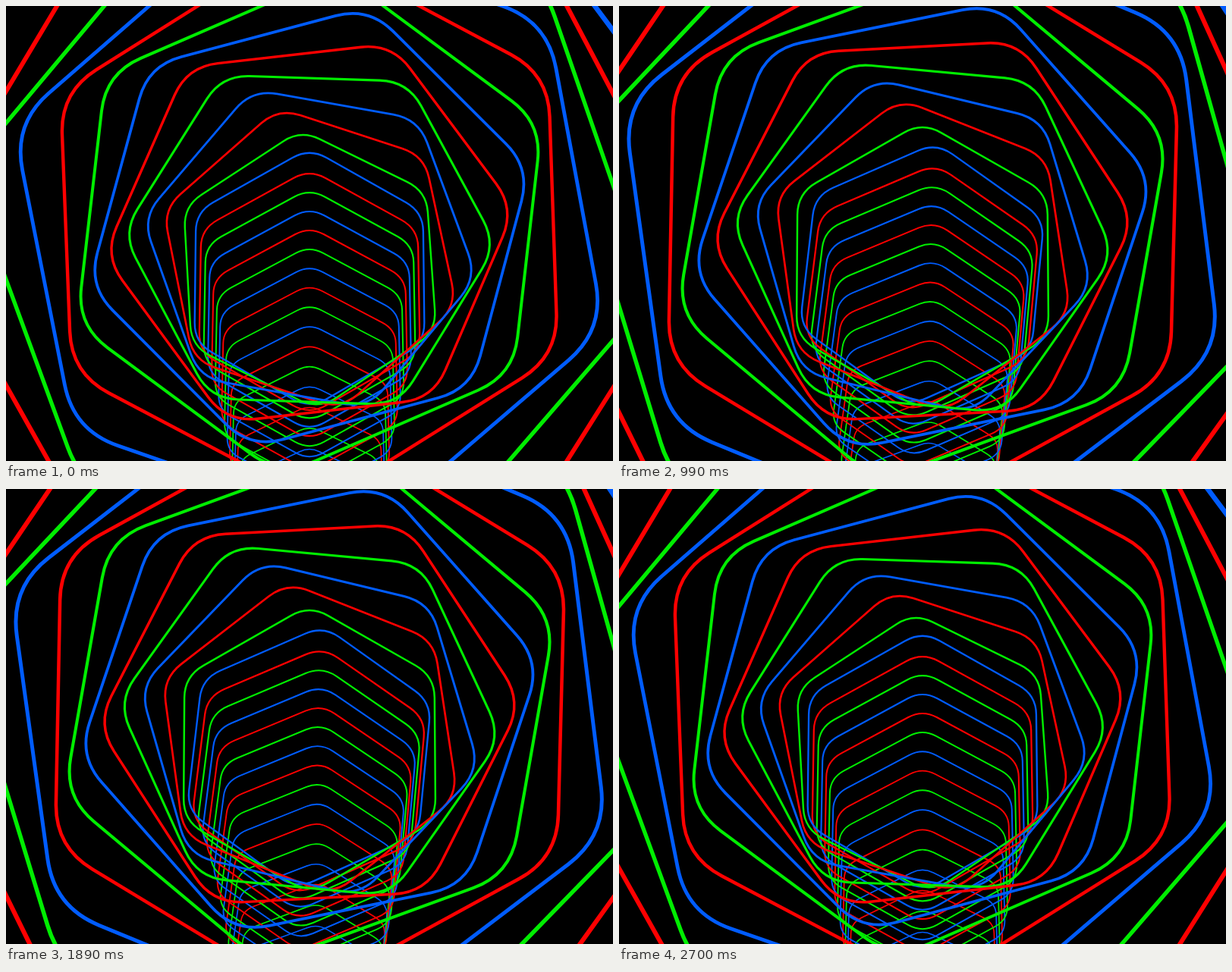
An HTML page with a canvas that plays this animation: 800x600 px, repeating every 2730 ms.

```html
<!DOCTYPE html>
<html>
<head>
<meta charset="utf-8">
<title>Hexagon tunnel</title>
<style>
  html, body { margin: 0; height: 100%; overflow: hidden; background: #000; }
  canvas { display: block; }
</style>
</head>
<body>
<canvas id="stage" width="800" height="600"></canvas>
<script>
const ctx = document.getElementById('stage').getContext('2d');
const COLORS = ['#00ee00', '#ff0000', '#005cff'];
const STEP = 30, FRAMES = 91, CYCLE = 30;
const FOCAL = 2000;
const BEND = -0.45;  // where the sloping shaft turns into the twisting mouth
const ROUND = 0.15;  // share of each edge taken by a rounded corner
const RAD = Math.PI / 180;

// Screen height, radius and twist (degrees) of a ring at depth u; larger u is nearer.
function ringAt(u) {
  if (u < BEND) {
    const n = -1 - u;
    return { y: 357 + 16.9 * n + 0.25 * n * n, r: 1 / (0.00575 + 0.000257 * n), twist: 0 };
  }
  const r = 45.2 + 140.6 * Math.exp(0.12 * u), w = u - BEND;
  const drop = 0.248 + u * (-0.1036 + u * (0.01115 - 0.0003 * u));
  return { y: 300 + r * drop, r, twist: 8 * w + 0.045 * w * w };
}

// Rings stand square to the path, so their lean follows its slope.
function leanAt(u) {
  const far = ringAt(u - 1), near = ringAt(u + 1);
  const fall = (far.y - 300) / far.r - (near.y - 300) / near.r;
  return Math.atan2(fall, FOCAL / far.r - FOCAL / near.r);
}

function drawRing(u, spin, color) {
  const { y, r, twist } = ringAt(u);
  const lean = leanAt(u), angle = (spin - twist) * RAD;
  const corner = k => {
    const a = angle + k * Math.PI / 3;
    return [Math.sin(a), Math.cos(a)];
  };
  const project = ([px, py]) => {
    const scale = r / (1 + py * Math.sin(lean) * r / FOCAL);
    return [400 + px * scale, y - py * Math.cos(lean) * scale];
  };
  const toward = (a, b) => project(a.map((v, i) => v + (b[i] - v) * ROUND));

  ctx.beginPath();
  for (let k = 0; k < 6; k++) {
    const tip = corner(k);
    ctx.lineTo(...toward(tip, corner(k - 1)));
    ctx.quadraticCurveTo(...project(tip), ...toward(tip, corner(k + 1)));
  }
  ctx.closePath();
  ctx.lineWidth = 0.5 + 0.0105 * r;
  ctx.strokeStyle = color;
  ctx.stroke();
}

function draw(now) {
  const frame = Math.floor(now / STEP) % FRAMES;
  const phase = frame % CYCLE / CYCLE;
  ctx.fillStyle = '#000';
  ctx.fillRect(0, 0, 800, 600);
  for (let i = -21; i <= 12; i++) {
    drawRing(i + 3 * phase, 60 * phase, COLORS[(i + 21) % 3]);
  }
}

const start = performance.now();
function tick() {
  draw(performance.now() - start);
  requestAnimationFrame(tick);
}
tick();
</script>
</body>
</html>
```
